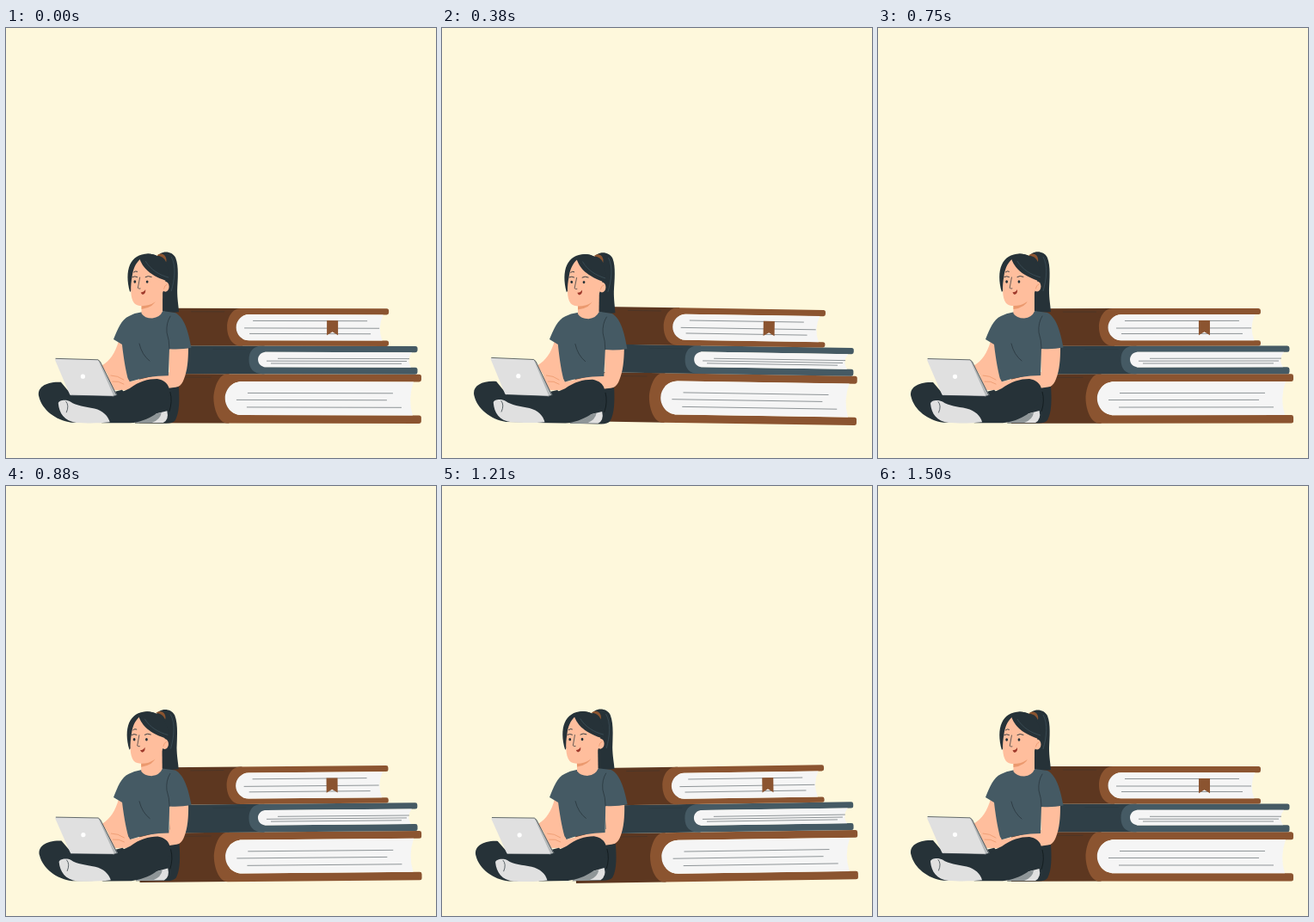
Recreate the animation shown at these times as an HTML page. Size 500 by 500 pixels, loop 1.54 s.

```html
<!DOCTYPE html>
<html lang="en">
<head>
<meta charset="utf-8">
<title>Reading corner</title>
<style>
html, body { margin: 0; width: 100%; height: 100%; overflow: hidden; background: #fef8dc; }
svg { display: block; width: 100vw; height: 100vh; }
.ink { fill: #263238; }
.skin { fill: #ffbe9d; }
.shirt { fill: #455a64; }
.light { fill: #e0e0e0; }
.line { fill: none; stroke: #263238; stroke-width: .7; stroke-linecap: round; }
.thin { fill: none; stroke: #263238; stroke-width: .5; }
.strand { fill: none; stroke: #455a64; stroke-width: .6; }
.blush { fill: none; stroke: #eb996e; stroke-width: .8; stroke-linecap: round; }
</style>
</head>
<body>
<svg viewBox="0 0 500 500">
  <g id="books"></g>
  <g id="girl">
    <!-- ponytail -->
    <path class="ink" d="M175 267C178 259 192 257.500 197 267C201 277 199.500 292 199 305C199 315 200.500 322 201 330C194 331 186 331 181 329L181 300Z"/>
    <path class="strand" d="M192 266C198 277 196 292 192 306"/>
    <!-- arms -->
    <path class="skin" d="M131 364L145 368V411C146 414 145 416 143 418C137 421 129 420 123 418L118 403L111.500 392.500C121 387 127 378 131 364Z"/>
    <path class="skin" d="M189 372H212C212 386 211 398 207 408C204 417 198 419 189 419L150 421H125C122 416 134 412 145 411L190 400Z"/>
    <!-- neck and shirt -->
    <path class="shirt" d="M157 330.500L182 329L197 331C207 336 212 352 215.500 371.500Q203 374 190 373L189 404Q165 404 143 411.500C140 402 137 386 135 368L125 362C130 350 134 339 143 335Q149 331.500 157 330.500Z"/>
    <path class="skin" d="M157.500 315V332Q161 337.500 170 337.500Q179 336.500 182 329.500V300Z"/>
    <path d="M157.500 321.500Q168 323 175 315Q172 325 157.500 327Z" fill="#eb996e"/>
    <path class="line" d="M191 335Q186 343 187 354Q190 363 190 373M155 367Q158 380 167 387"/>
    <!-- head -->
    <path class="ink" d="M144 307C137 282 144 262.500 165 262.500C181 263 190 276 190 295L184 308L150 300Z"/>
    <path class="skin" d="M156 268.500C150 274 147.500 281 146.500 289C144.500 299 144 314 149 320C153 324 160 323.500 166 322C175 319 181 312 183 305L186 290Z"/>
    <path class="ink" d="M155 268C159 279 167 288 189.500 295C191 276 181 263 165 262.500Q159 263 155 268Z"/>
    <path class="strand" d="M162 271C168 281 178 287 189 290"/>
    <path d="M175 264.500Q180 260.500 184.500 264.500Q187 268 186 272Q183 265 175 264.500Z" fill="#8b5430"/>
    <ellipse class="skin" cx="185" cy="300.500" rx="4.500" ry="6"/>
    <path class="blush" d="M183.500 303Q184 299 187 298"/>
    <ellipse class="ink" cx="149.700" cy="295" rx="1.400" ry="1.700"/>
    <ellipse class="ink" cx="164" cy="295" rx="1.400" ry="1.700"/>
    <path class="line" d="M148.500 283.800Q150.500 282 152.500 283.200M147 289.500Q149.500 288 152.500 289.500M162 289.500Q165 287.500 169 289.300" style="stroke-width:.9"/>
    <path class="line" d="M155.500 290L153.200 302.200Q154.500 303.500 156 303"/>
    <path d="M156.500 307.300Q160 307.500 162 304Q162.800 309 158.800 310Q157.200 309.500 156.500 307.300Z" fill="#9f3a2c"/>
    <!-- far leg, hip, feet -->
    <path class="ink" d="M64 412C47 411 35.500 418 38.500 429C42 444 58 456.500 76 458.800H130L140 425H75Z"/>
    <path class="ink" d="M180 420L201 417C202 432 202 447 197 456Q194 460 184 459.500H150Z"/>
    <path class="light" d="M187.500 445Q190 455 183 459H150L168 450Z"/>
    <path d="M181 447Q180 455 170 459H150L168 450Z" fill="#8f9698"/>
    <!-- near leg -->
    <path class="ink" d="M110 434C115 428 130 426 144 419C155 411 165 408 176 408C188 410 193 419 189 430C184 445 166 457 145 459.300H112C96 455 80 441 73 432Z"/>
    <path d="M191 423Q194 434 190 446" fill="none" stroke="#10181b" stroke-width=".8"/>
    <path class="light" d="M61 437C60.500 433 70 431.500 75 434.500C82 439.500 92 440 103 442.500C113 445 119 451 121 458.300C106 460 92 459.500 82 459C68 457.500 62 448 61 437Z"/>
    <path class="line" d="M70 434.500Q74 439 70.500 447"/>
    <!-- hands and laptop -->
    <path class="skin" d="M119 403Q129 400 137 404Q145 409 144 414Q136 420 124 419.500Z"/>
    <path class="blush" d="M122 404Q130 404 137 409M124 411Q131 410 137 414"/>
    <path class="ink" d="M122 424L135 420.800L137 422.500L127 428Z"/>
    <path d="M106 385.500L109 387L129.500 427L124 428.500Z" fill="#b5b9ba"/>
    <path class="light" d="M58 384.500L107 386L125.500 428.300L76 427.300Q74.500 427 74 425.500L57 386Z"/>
    <path class="line" d="M58 384.500L107 385.800L109.500 388L129 427.500L124 428.300L76 427.300"/>
    <circle cx="89.500" cy="405.300" r="2.600" fill="#fff"/>
  </g>
</svg>
<script>
const LOOP = 1540, SWING = 0.9, LEAD = 35;
const books = document.getElementById('books');
const girl = document.getElementById('girl');

// y: outer top, inner top, inner bottom, outer bottom; lines: y, from, to
function book({ y, spine, back, page, edge, end, dark, cover, lines }) {
  const [a, b, c, d] = y, m = (a + d) / 2, n = (b + c) / 2;
  const bend = (c - b) / 2, k = bend * 0.55, r = 2.5;
  const inner = `C${page + bend - k} ${b} ${page} ${n - k} ${page} ${n}` +
    `C${page} ${n + k} ${page + bend - k} ${c} ${page + bend} ${c}`;
  const marks = lines.map(([ly, x1, x2]) => `M${x1} ${ly}H${x2}`).join('');
  return `<path fill="${dark}" d="M${spine} ${a}H${back + 18}V${d}H${spine}Z"/>
    <path fill="${cover}" d="M${back + 16} ${a}H${end - r}q${r} 0 ${r} ${r}V${b - r}q0 ${r} ${-r} ${r}
      H${page + bend}${inner}H${end - r}q${r} 0 ${r} ${r}V${d - r}q0 ${r} ${-r} ${r}H${back + 16}
      C${back + 5} ${d} ${back} ${m + 10} ${back} ${m}C${back} ${m - 10} ${back + 5} ${a} ${back + 16} ${a}Z"/>
    <path fill="#f5f5f5" d="M${page + bend} ${b}${inner}H${edge}Q${edge - 6} ${n} ${edge + 1} ${b}Z"/>
    <path class="thin" d="${marks}"/>
    <path class="thin" opacity=".6" d="M${back - 42} ${a + 4}H${back - 3}"/>`;
}

const brown = { dark: '#5d3720', cover: '#8b5430' };
books.innerHTML = book({
  ...brown, y: [402.3, 411.2, 450.2, 459.6], spine: 155, back: 241.5, page: 254.800, edge: 473, end: 483,
  lines: [[424.5, 281, 450], [432.5, 268, 443], [441, 280, 460]]
}) + book({
  dark: '#2f3f47', cover: '#455a64', y: [369.6, 376.8, 394.4, 402.3], spine: 190, back: 282.5,
  page: 293, edge: 471, end: 478.5,
  lines: [[384.3, 316, 469], [387.2, 303, 466], [390, 308, 460]]
}) + book({
  ...brown, y: [326, 333.2, 363.3, 369.6], spine: 185, back: 257, page: 267.500, edge: 437.5, end: 445,
  lines: [[340.5, 287, 420], [349, 277, 434], [355.5, 283, 424]]
}) + '<path fill="#8b5430" d="M373 340H386V357.200L379.500 353.200L373 357.200Z"/>';

function draw(now) {
  const angle = SWING * Math.sin(2 * Math.PI * (now + LEAD) / LOOP);
  books.setAttribute('transform', `rotate(${angle} 319 393)`);
  girl.setAttribute('transform', `rotate(${angle} 127 360.500)`);
}

let start;
function tick(now) {
  start ??= now;
  draw((now - start) % LOOP);
  requestAnimationFrame(tick);
}
draw(0);
requestAnimationFrame(tick);
</script>
</body>
</html>
```
